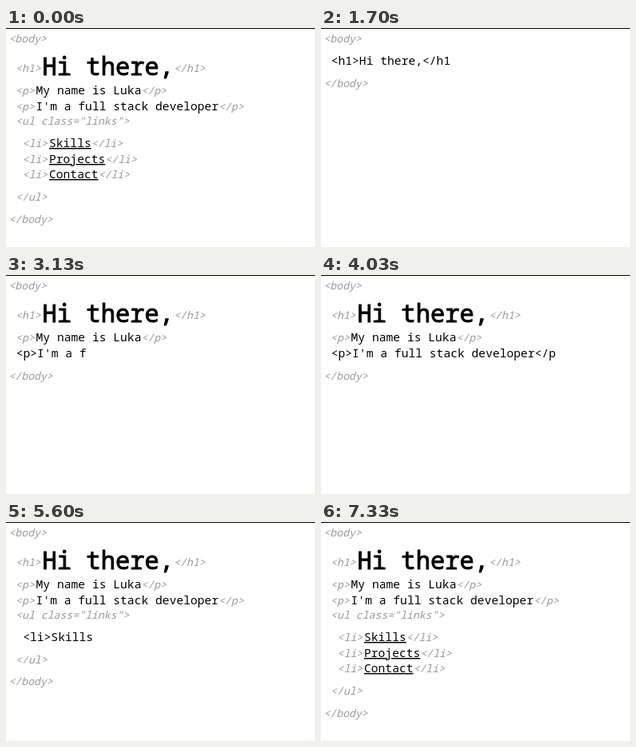
An HTML page for the animation above (7960 ms loop, 387 px wide and 274 px high).

```html
<!DOCTYPE html>
<html lang="en">
<head>
<meta charset="utf-8">
<title>Typed page</title>
<style>
  html, body { margin: 0; width: 100%; height: 100%; overflow: hidden; background: #fff; }
  svg { display: block; width: 387px; height: 274px; }
  text { font: 14.667px "Noto Sans Mono", "DejaVu Sans Mono", monospace; white-space: pre; fill: #000; }
  .tag { font-size: 13.2px; font-style: italic; fill: #999; }
  .heading { font-size: 30.5px; stroke: #000; stroke-width: 0.9px; }
  .link { text-decoration: underline; text-decoration-thickness: 1px; text-underline-offset: 2px; }
</style>
</head>
<body>
<svg id="stage" viewBox="0 0 387 274"></svg>
<script>
const LOOP = 7960;
const KEY_TIME = 41;
const LINE = 19.6;
const TAG_LINE = 18.6;
const BLOCK_END = 8.5;
const INDENT = [4, 12.7, 21.2];
const TAG_SHIFT = -0.6;
const CONTENT_GAP = 1.7;

const element = (at, depth, open, text, close, style = "") =>
  ({ at, depth, open, text, close, style, source: open + text + close });

const page = element(430, 0, "<body>", "\n", "</body>");
const heading = element(1042, 1, "<h1>", "Hi there,", "</h1>", "heading");
const paragraphs = [
  element(1806, 1, "<p>", "My name is Luka", "</p>"),
  element(2760, 1, "<p>", "I'm a full stack developer", "</p>"),
];
const list = element(4162, 1, '<ul class="links">', "\n", "</ul>");
const items = [
  element(5228, 2, "<li>", "Skills", "</li>", "link"),
  element(5918, 2, "<li>", "Projects", "</li>", "link"),
  element(6672, 2, "<li>", "Contact", "</li>", "link"),
];

const stage = document.getElementById("stage");
let lastMarkup = "";

const escapeText = s => s.replace(/&/g, "&amp;").replace(/</g, "&lt;").replace(/>/g, "&gt;");
const span = (s, style, dx = 0, dy = 0) =>
  `<tspan class="${style}" dx="${dx}" dy="${dy}">${escapeText(s)}</tspan>`;
const openTag = s => span(s, "tag", TAG_SHIFT);

function render(time) {
  // Until the first key is pressed the finished page stays on screen.
  const now = time < page.at ? LOOP : time;
  const out = [];
  let y = 19;

  const typed = el => Math.max(0, Math.floor((now - el.at) / KEY_TIME) + 1);
  const isDone = el => typed(el) > el.source.length;
  const write = (depth, baseline, content) =>
    out.push(`<text x="${INDENT[depth]}" y="${Math.round(baseline)}">${content}</text>`);

  function writeTyping(el) {
    for (const line of el.source.slice(0, typed(el)).split("\n")) {
      write(el.depth, y, escapeText(line));
      y += LINE;
    }
  }

  function writeLine(el) {
    if (!typed(el)) return;
    if (!isDone(el)) return writeTyping(el);
    const isHeading = el === heading;
    const drop = isHeading ? 4 : 0;
    write(el.depth, isHeading ? 55 : y,
      openTag(el.open) + span(el.text, el.style, CONTENT_GAP, drop) + span(el.close, "tag", 0, -drop));
    y = isHeading ? 83 : y + LINE;
  }

  function writeBlock(el, writeChildren) {
    if (!typed(el)) return;
    if (!isDone(el)) return writeTyping(el);
    write(el.depth, y - 1, openTag(el.open));
    y += 27;
    writeChildren();
    y += BLOCK_END;
    write(el.depth, y, openTag(el.close));
    y += TAG_LINE;
  }

  writeBlock(page, () => {
    [heading, ...paragraphs].forEach(writeLine);
    writeBlock(list, () => items.forEach(writeLine));
  });

  const markup = '<rect width="387" height="1"/>' + out.join("");
  if (markup !== lastMarkup) stage.innerHTML = lastMarkup = markup;
}

const begin = performance.now();
function tick() {
  render((performance.now() - begin) % LOOP);
  requestAnimationFrame(tick);
}
tick();
</script>
</body>
</html>
```
